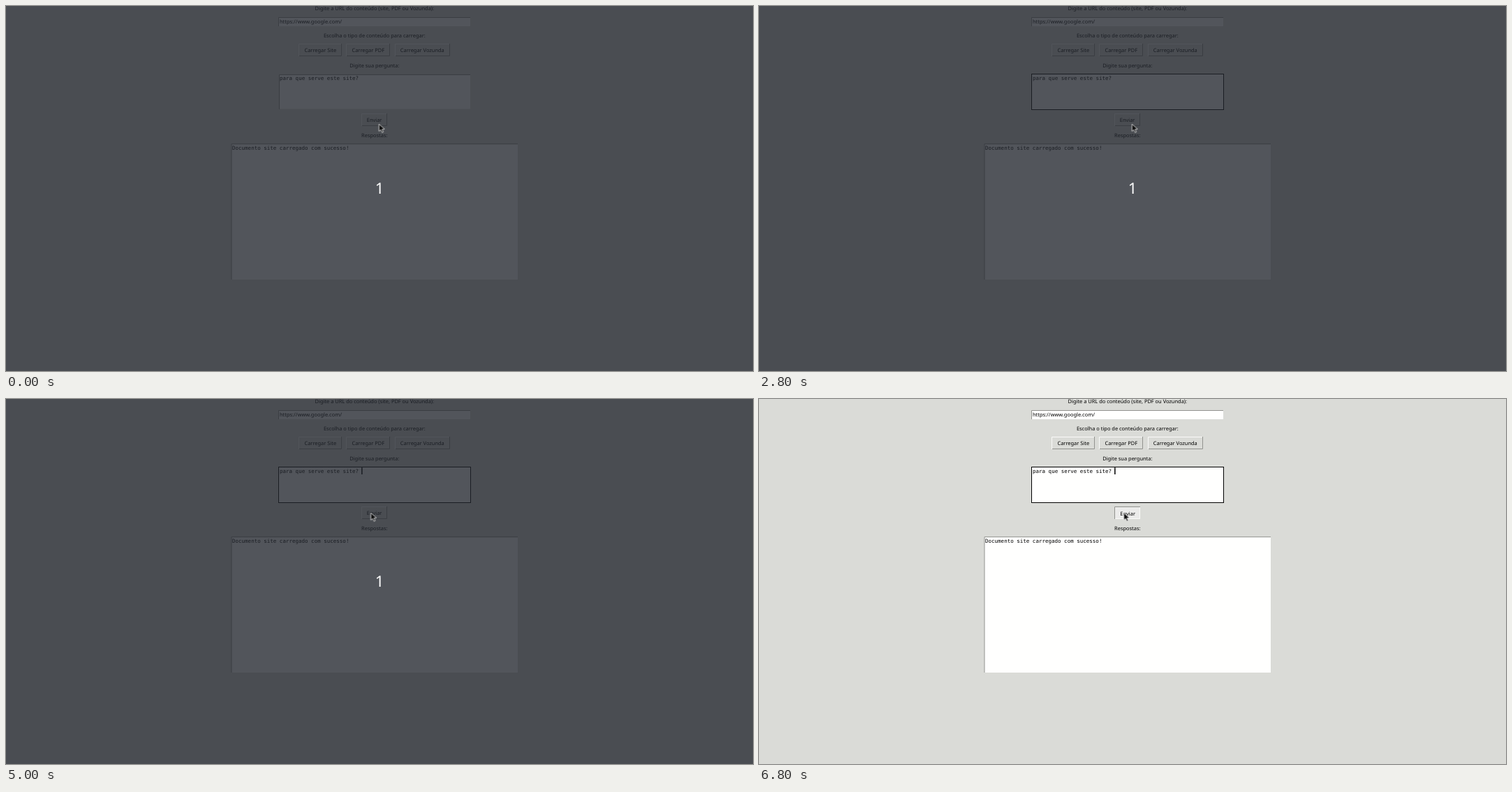
An HTML page for the animation above (8 s loop, 1070 by 523 pixels).

```html
<!DOCTYPE html>
<html lang="pt-BR">
<head>
<meta charset="utf-8">
<title>Perguntas sobre conteúdo</title>
<style>
  html, body { margin: 0; width: 100%; height: 100%; overflow: hidden; background: #dadbd7; }
  svg { display: block; width: 1070px; height: 523px; }
  text {
    font: 7.45px "Noto Sans", sans-serif;
    text-anchor: middle;
    text-rendering: geometricPrecision;
    white-space: pre;
  }
  .entry { text-anchor: start; }
  .mono { font: 7.53px "DejaVu Sans Mono", monospace; text-anchor: start; }
  .count { font-size: 22px; fill: #fff; }
  .field { fill: #fffffe; }
  .light, .dark { fill: none; stroke-width: 1; }
  .light { stroke: #fafaf9; }
  .dark { stroke: #92938f; }

  .focus, .caret, .veil, .lit, .up, .down, .cursor { animation: 8s step-end infinite; }
  .focus { animation-name: focus; }
  .caret { animation-name: caret; }
  .veil { animation-name: veil; }
  .lit { animation-name: lit; }
  .up { animation-name: up; }
  .down { animation-name: down; }
  .cursor { animation-name: move; }

  @keyframes focus { 0% { opacity: 0 } 5%, 100% { opacity: 1 } }
  @keyframes veil { 0% { opacity: 1 } 76.25%, 100% { opacity: 0 } }
  @keyframes lit { 0% { opacity: 0 } 76.25%, 100% { opacity: 1 } }
  @keyframes up { 0% { opacity: 1 } 85%, 100% { opacity: 0 } }
  @keyframes down { 0% { opacity: 0 } 85%, 100% { opacity: 1 } }
  @keyframes caret {
    0%, 12.5%, 23.75%, 35%, 46.25%, 58.75%, 68.75%, 81.25% { opacity: 0 }
    5%, 16.25%, 27.5%, 38.75%, 50%, 61.25%, 72.5%, 83.75%, 100% { opacity: 1 }
  }
  @keyframes move {
    0% { transform: translate(534.3px, 169.3px) }
    41.25% { transform: translate(545px, 189px) }
    42.5% { transform: translate(564px, 219px) }
    43.75% { transform: translate(576.5px, 231.8px) }
    45% { transform: translate(578.5px, 231.5px) }
    53.75% { transform: translate(573px, 226px) }
    55% { transform: translate(546px, 200px) }
    56.25% { transform: translate(512px, 170px) }
    57.5% { transform: translate(498.6px, 161px) }
    58.75% { transform: translate(504px, 161px) }
    60% { transform: translate(514px, 162.5px) }
    61.25% { transform: translate(520.5px, 163.3px) }
    62.5%, 100% { transform: translate(522.6px, 163.3px) }
  }
</style>
</head>
<body>
<svg viewBox="0 0 1070 523">
  <rect width="1070" height="523" fill="#dadbd7"/>

  <text x="527.8" y="6.3">Digite a URL do conteúdo (site, PDF ou Vozunda):</text>
  <rect class="field" x="391" y="17" width="274" height="12"/>
  <path class="dark" d="M390.5 29V16.5H665"/>
  <text class="entry" x="392" y="25.3">https://www.google.com/</text>

  <text x="527.8" y="44.8">Escolha o tipo de conteúdo para carregar:</text>
  <path class="light" d="M419.5 72V54.5H480M487.5 72V54.5H549M557.5 72V54.5H635"/>
  <path class="dark" d="M420 71.5H480.5V54M488 71.5H549.5V54M558 71.5H635.5V54"/>
  <text x="450.3" y="66.2">Carregar Site</text>
  <text x="518.8" y="66.2">Carregar PDF</text>
  <text x="596.3" y="66.2">Carregar Vozunda</text>

  <text x="527.8" y="87.8">Digite sua pergunta:</text>
  <rect class="field" x="392" y="98.5" width="273" height="49"/>
  <path class="dark" d="M391.5 148V98.5H665"/>
  <rect class="focus" x="390.5" y="97.5" width="275" height="51" fill="#fffffe" stroke="#000"/>
  <text class="mono" x="392" y="105.9">para que serve este site?</text>
  <rect class="caret" x="509.1" y="98.2" width="1.5" height="9.8"/>

  <rect class="lit" x="509" y="154" width="37" height="18" fill="#ebebea"/>
  <g class="up">
    <path class="light" d="M509.5 172V154.5H545"/>
    <path class="dark" d="M510 171.5H545.5V154"/>
    <text x="527.6" y="166.3">Enviar</text>
  </g>
  <g class="down">
    <path class="light" d="M510 171.5H545.5V154"/>
    <path class="dark" d="M509.5 172V154.5H546"/>
    <text x="528.2" y="167.4">Enviar</text>
  </g>

  <text x="527.8" y="187.8">Respostas:</text>
  <rect class="field" x="323" y="198" width="410" height="194"/>
  <path class="dark" d="M323 392V197.7H733"/>
  <text class="mono" x="324" y="206">Documento site carregado com sucesso!</text>

  <g class="veil">
    <rect width="1070" height="523" fill="#22262e" fill-opacity=".78"/>
    <text class="count" x="535" y="268.5">1</text>
  </g>

  <path class="cursor" d="M0 0V10.2L2.5 8.1L4.5 12L6.3 11.1L4.4 7.4L8 7.1Z"
    fill="#0c0c0c" stroke="#f4f4f4" stroke-width=".8" stroke-linejoin="round"/>
</svg>
</body>
</html>
```
